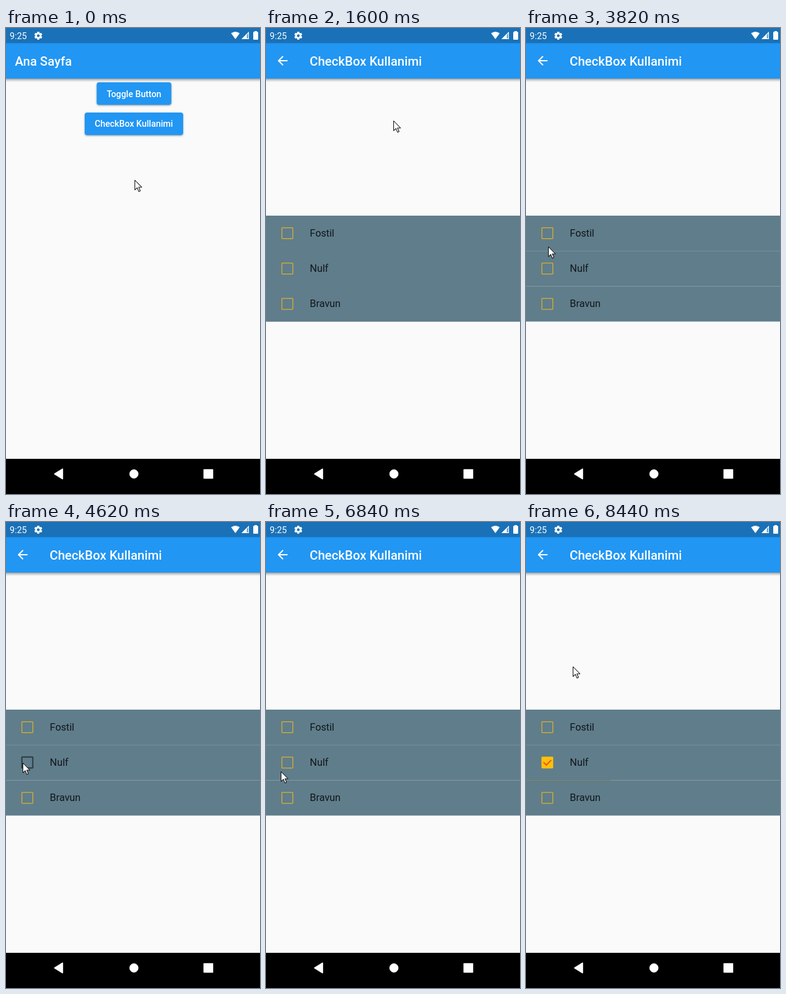
An HTML page for the animation above (9240 ms loop, 413x755 px).

```html
<!DOCTYPE html>
<html lang="tr">
<head>
<meta charset="utf-8">
<title>CheckBox Kullanimi</title>
<style>
  html, body { margin: 0; width: 100%; height: 100%; overflow: hidden; background: #fafafa; }
  svg { display: block; width: 413px; height: 755px; font-family: Roboto, sans-serif; }
  .title { font-size: 20.5px; font-weight: 500; fill: #fff; }
  .label { font-size: 14.3px; font-weight: 500; fill: #fff; text-anchor: middle; }
  .item { font-size: 16.3px; fill: #10171a; }
  .raised { fill: #2196f3; filter: drop-shadow(0 1.5px 1.5px rgba(0,0,0,.38)); }
  .lifted { fill: #3ea3f5; filter: drop-shadow(0 4px 4px rgba(0,0,0,.36)); }
  .bar { fill: #2196f3; filter: drop-shadow(0 2px 2px rgba(0,0,0,.42)); }
  .box { fill: none; stroke: #dcb22b; stroke-width: 1.25; }
  .box.pressed { stroke: #2c3940; stroke-width: 2; }
  .box.checked { fill: #ffc107; stroke: #ffc107; }
  .tick { fill: none; stroke: #f4511e; stroke-width: 2; }
</style>
</head>
<body>
<svg viewBox="0 0 413 755">
  <defs>
    <clipPath id="buttonClip"><rect x="128" y="137" width="160" height="36.5" rx="4"/></clipPath>
    <clipPath id="rowClip"><rect y="361.2" width="413" height="57.2"/></clipPath>
  </defs>
  <rect width="413" height="755" fill="#fafafa"/>
  <rect class="bar" x="-10" width="433" height="82"/>
  <rect width="413" height="24.5" fill="#1a71b7"/>

  <g fill="#fff">
    <text x="6.1" y="18" font-size="14.4">9:25</text>
    <g transform="translate(52.5 12.5)">
      <circle r="4.9"/>
      <g id="teeth"></g>
      <circle r="2.2" fill="#1a71b7"/>
    </g>
    <path d="M366 8.6Q373 3.4 380 8.6L373 18Z"/>
    <path d="M383 18L395 6V18Z" fill-opacity=".3"/>
    <path d="M383 18L391.5 9.5V18Z"/>
    <path d="M394.4 7.4V17.4H384.5Z" fill="none" stroke="#fff" stroke-width="1.1"/>
    <path d="M404 6.3V5h4V6.3h1.2q.8 0 .8.8V18q0 1-1 1h-6q-1 0-1-1V7.1q0-.8.8-.8Z"/>
  </g>

  <g id="home">
    <text class="title" x="14.6" y="60.8">Ana Sayfa</text>
    <rect class="raised" x="147.5" y="88" width="121.3" height="36.5" rx="4"/>
    <text class="label" x="208.1" y="111.5">Toggle Button</text>
    <rect id="button" x="128" y="137" width="160" height="36.5" rx="4"/>
    <circle id="buttonInk" cx="207.5" cy="150.5" fill="#fff" clip-path="url(#buttonClip)"/>
    <text class="label" x="207.8" y="160.4">CheckBox Kullanimi</text>
  </g>

  <g id="page">
    <path transform="translate(15 41)" fill="#fff"
      d="M20 11H7.83l5.59-5.59L12 4l-8 8 8 8 1.41-1.41L7.83 13H20z"/>
    <text class="title" x="71.1" y="60.8">CheckBox Kullanimi</text>
    <rect id="backing" y="304" width="413" height="171.6" fill="#607d8b"/>
    <g id="rows"></g>
    <path id="tint" d="M0 418.5H138" stroke="#85895f"/>
    <circle id="rowInk" cx="24" cy="404" fill="#c8c8c8" clip-path="url(#rowClip)"/>
    <g id="items"></g>
  </g>

  <rect y="698" width="413" height="57" fill="#000"/>
  <g fill="#fff" stroke="#fff" stroke-linejoin="round">
    <path d="M79 722.5L92 714.5V730.5Z" stroke-width="1.6"/>
    <circle cx="208" cy="722.5" r="7" stroke-width=".8"/>
    <rect x="322" y="715.7" width="14" height="13.6" stroke-width="1.8"/>
  </g>

  <path id="cursor" d="M.5.5V16.3L4.2 12.8L6.9 18.9L9.4 17.8L6.8 12H11.8Z"
    fill="#fff" stroke="#111" stroke-width="1.05" stroke-linejoin="round"/>
</svg>
<script>
const LOOP = 9240, BEAT = 200;
const LIST_TOP = 304, ROW = 57.2;
const BOX = { x: 25.8, y: 19.6, size: 17.8 };

// Events, in beats.
const PRESS = 6, OPEN = 8, SETTLED = 9, TAP = 35, CHECKED = 36, RELEASED = 38;

// Pointer strokes: each eases to a point between two beats.
const strokes = [
  { from: 0, to: 4, x: 207, y: 150 },
  { from: 8, to: 11, x: 126, y: 230 },
  { from: 11, to: 15, x: 41, y: 335 },
  { from: 17, to: 22, x: 27, y: 390 },
  { from: 23, to: 26, x: 83, y: 428 },
  { from: 26, to: 30, x: 46, y: 453 },
  { from: 30, to: 34, x: 24, y: 404 },
  { from: 35, to: 38, x: 35, y: 363 },
  { from: 39, to: 42, x: 76, y: 234 }
];

const $ = id => document.getElementById(id);
const set = (el, attrs) => Object.entries(attrs).forEach(([k, v]) => el.setAttribute(k, v));
const show = (el, on) => { el.style.display = on ? '' : 'none'; };
const ease = p => p * p * (3 - 2 * p);

function add(parent, tag, attrs, text = '') {
  const el = document.createElementNS('http://www.w3.org/2000/svg', tag);
  set(el, attrs);
  el.textContent = text;
  return parent.appendChild(el);
}

function beatAt(t) {
  const lag = t < 3200 ? 0 : t < 5600 ? 20 : 40;
  return Math.floor((t - lag) / BEAT);
}

function pointer(beat) {
  let x = 209, y = 246;
  for (const s of strokes) {
    const p = ease(Math.min(1, Math.max(0, (beat - s.from) / (s.to - s.from))));
    x += (s.x - x) * p;
    y += (s.y - y) * p;
  }
  return { x, y };
}

function overBox({ x, y }, top) {
  const dx = x - BOX.x, dy = y - top - BOX.y;
  return Math.min(dx, dy) >= 0 && Math.max(dx, dy) <= BOX.size;
}

for (const turn of [0, 60, 120])
  add($('teeth'), 'rect', { x: -1.8, y: -6.5, width: 3.6, height: 13, rx: .7, transform: `rotate(${turn})` });

const items = ['Fostil', 'Nulf', 'Bravun'].map((name, i) => {
  const top = LIST_TOP + i * ROW;
  // Fractional row edges leave the faint seams between rows.
  add($('rows'), 'rect', { y: top, width: 413, height: ROW, fill: '#607d8b' });
  const item = add($('items'), 'g', { transform: `translate(0 ${top})` });
  add(item, 'text', { class: 'item', x: 71.3, y: 34 }, name);
  const box = add(item, 'rect', { x: BOX.x, y: BOX.y, width: BOX.size, height: BOX.size, rx: .8 });
  const tick = add(item, 'path', { class: 'tick', d: 'M28.4 28.1L33 32.6L41 24.5' });
  return { top, box, tick };
});

function drawInk(el, age, life, radius, growth) {
  const on = age >= 0 && age < life;
  show(el, on);
  if (on) set(el, { r: radius + growth * age, 'fill-opacity': .3 * (1 - age / (life + 3)) });
}

function draw(t) {
  const beat = beatAt(t);
  const now = pointer(beat), before = pointer(beat - 1);
  show($('home'), beat < OPEN);
  show($('page'), beat >= OPEN);
  show($('backing'), beat < SETTLED);
  show($('tint'), beat >= RELEASED);
  set($('button'), { class: beat < PRESS ? 'raised' : 'lifted' });
  drawInk($('buttonInk'), beat - PRESS, OPEN - PRESS, 12, 19);
  drawInk($('rowInk'), beat - TAP, RELEASED - TAP, 24, 52);

  items.forEach(({ top, box, tick }, i) => {
    const checked = i === 1 && beat >= CHECKED;
    const pressed = overBox(now, top) && overBox(before, top);
    set(box, { class: checked ? 'box checked' : pressed ? 'box pressed' : 'box' });
    show(tick, checked);
  });
  set($('cursor'), { transform: `translate(${Math.round(now.x)} ${Math.round(now.y)})` });
}

const start = performance.now();
function run() {
  draw((performance.now() - start) % LOOP);
  requestAnimationFrame(run);
}
run();
</script>
</body>
</html>
```
